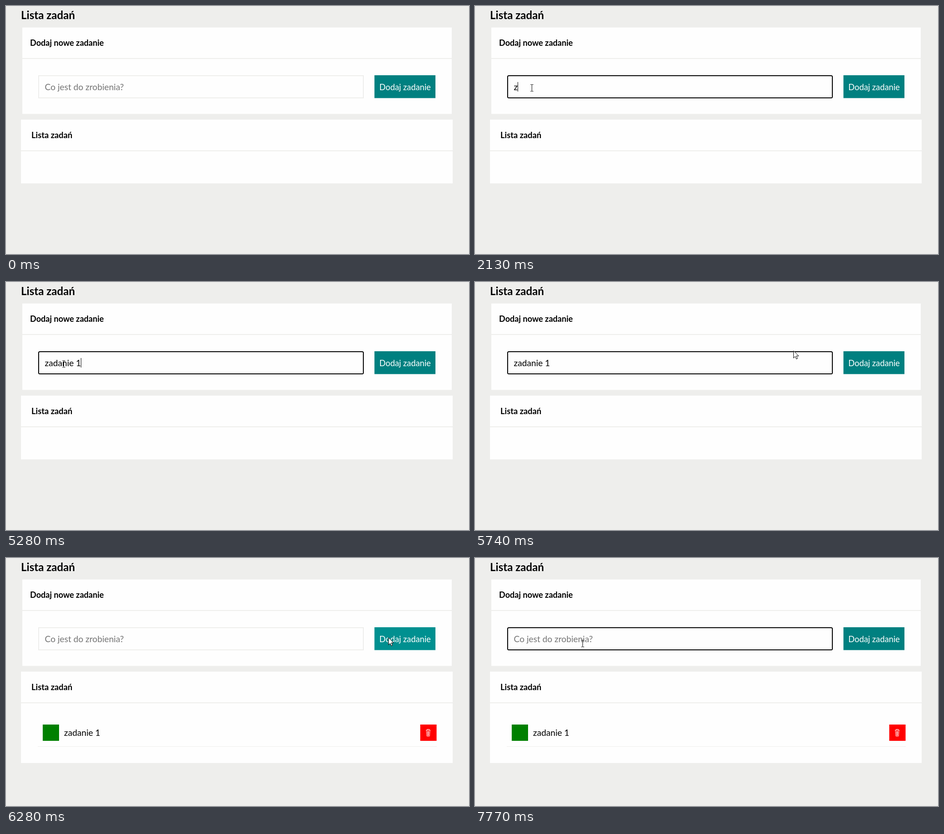
Write an HTML page that moves like this. It is 1021 px wide and 548 px high and loops after 8 s.

```html
<!DOCTYPE html>
<html lang="pl">
<head>
<meta charset="utf-8">
<title>Lista zadań</title>
<style>
  html, body { margin: 0; width: 100%; height: 100%; overflow: hidden; background: #eeeeec; }
  svg { display: block; width: 1021px; height: 548px; font-family: Lato, sans-serif; }
  text { white-space: pre; }
  .bold { font-weight: 700; }
  .body { font-size: 19.2px; }
  .card { fill: #fefefe; }
  .rule { fill: #eeeeec; }
</style>
</head>
<body>
<svg viewBox="0 0 1021 548">
  <text class="bold" x="33" y="29" font-size="24.1">Lista zadań</text>

  <rect class="card" x="36" y="47.5" width="947" height="191"/>
  <rect class="rule" x="36" y="115" width="947" height="2"/>
  <text class="bold" x="53" y="88" font-size="18.1">Dodaj nowe zadanie</text>
  <rect id="field" x="72" y="154" width="716" height="49" fill="#fefefe" stroke-width="2"/>
  <text id="entry" class="body" x="85.5" y="185.5"></text>
  <rect id="caret" y="168" width="1" height="21"/>
  <rect id="button" x="812.5" y="153" width="134.5" height="50.5"/>
  <text x="880" y="185.5" font-size="18.3" fill="#fff" text-anchor="middle">Dodaj zadanie</text>

  <rect id="list" class="card" x="33" y="251" width="952"/>
  <rect class="rule" x="33" y="319" width="952" height="2"/>
  <text class="bold" x="56" y="292" font-size="18.3">Lista zadań</text>
  <g id="item">
    <rect x="81" y="368" width="36" height="36" fill="#008000"/>
    <text class="body" x="128" y="393">zadanie 1</text>
    <rect x="913.5" y="368" width="36" height="36" fill="#f00"/>
    <path d="M926 380.5h10M928.5 380v-1.5h5v1.5M927 381l1 12.5q3 1 6 0l1-12.5M929.5 382.5l.5 10M931 382.5v10M932.5 382.5l-.5 10"
          fill="none" stroke="#fff" stroke-width=".9"/>
    <rect class="rule" x="70" y="416" width="880" height="1"/>
  </g>

  <g id="cursor">
    <path id="arrow" d="M0 0V16L3.7 12.5L6.2 18.2L8.8 17L6.3 11.5H11.3Z" fill="#fff" stroke="#000"/>
    <path id="beam" d="M-3 -7.5h2.3l.7.7l.7-.7H3M0 -7V7M-3 7.5h2.3l.7-.7l.7.7H3" fill="none" stroke="#000"/>
    <circle id="press" r="14" fill="#ff0" fill-opacity=".5"/>
  </g>
</svg>
<script>
const LOOP = 8000, BLINK = 530, TEXT_X = 85.5;
const $ = id => document.getElementById(id);
const pen = document.createElement('canvas').getContext('2d');

// start, end, number of positions, waypoints
const moves = [
  [130, 540, 7, [[828, 505], [118, 177]]],
  [880, 940, 2, [[121, 179], [125, 180.5]]],
  [5280, 6080, 12, [[126.5, 181], [470, 166], [795, 146.5], [842.5, 175.5]]],
  [6350, 6910, 9, [[826, 176], [510, 182], [243, 187]]],
  [7110, 7180, 2, [[239, 188], [237, 188.5]]]
];
const keys = [[2130, 'z'], [2400, 'a'], [2730, 'd'], [3080, 'a'], [3410, 'n'],
              [3620, 'i'], [3880, 'e'], [4410, ' '], [5020, '1']];
const clicks = [1270, 6150, 7240];
const SUBMIT = 6280;

const within = (t, a, b) => t >= a && t < b;
const show = (id, on) => $(id).setAttribute('visibility', on ? 'visible' : 'hidden');
const set = (id, attrs) => { for (const k in attrs) $(id).setAttribute(k, attrs[k]); };
const ease = p => (1 - Math.cos(Math.PI * p)) / 2;

function along(points, p) {
  const s = p * (points.length - 1);
  const i = Math.min(Math.floor(s), points.length - 2);
  return [0, 1].map(k => points[i][k] + (points[i + 1][k] - points[i][k]) * (s - i));
}

function cursorAt(t) {
  const move = moves.filter(m => t >= m[0]).pop();
  if (!move) return null;
  const [start, end, count, points] = move;
  const last = count - 1;
  const step = Math.min(last, Math.floor((t - start) / (end - start) * last + 0.05));
  return along(points, ease(step / last));
}

function draw(t) {
  const typed = t < SUBMIT ? keys.filter(k => t >= k[0]).map(k => k[1]).join('') : '';
  const focus = within(t, clicks[0], clicks[1]) || t >= clicks[2];
  set('field', { stroke: focus ? '#000' : '#eeeeec', rx: focus ? 2.5 : 0 });
  $('entry').textContent = typed || 'Co jest do zrobienia?';
  $('entry').setAttribute('fill', typed ? '#000' : '#757575');

  const reset = [clicks[0], ...keys.map(k => k[0]), clicks[2]].filter(v => t >= v).pop();
  show('caret', focus && Math.floor((t - reset) / BLINK) % 2 === 0);
  pen.font = '19.2px Lato, sans-serif';
  $('caret').setAttribute('x', Math.round(TEXT_X + pen.measureText(typed).width));

  const added = t >= SUBMIT;
  $('list').setAttribute('height', added ? 202 : 141);
  show('item', added);

  const pos = cursorAt(t);
  const [x, y] = pos || [0, 0];
  const overField = within(x, 71, 789) && within(y, 153, 204);
  const overButton = within(x, 812, 947) && within(y, 153, 204);
  $('button').setAttribute('fill', overButton ? '#009090' : '#008080');
  $('cursor').setAttribute('transform', `translate(${Math.round(x) + 0.5} ${Math.round(y)})`);
  show('arrow', pos && !overField);
  show('beam', pos && overField);
  show('press', clicks.some(c => within(t, c, c + 130)));
}

function frame() {
  draw(performance.now() % LOOP);
  requestAnimationFrame(frame);
}
frame();
</script>
</body>
</html>
```
